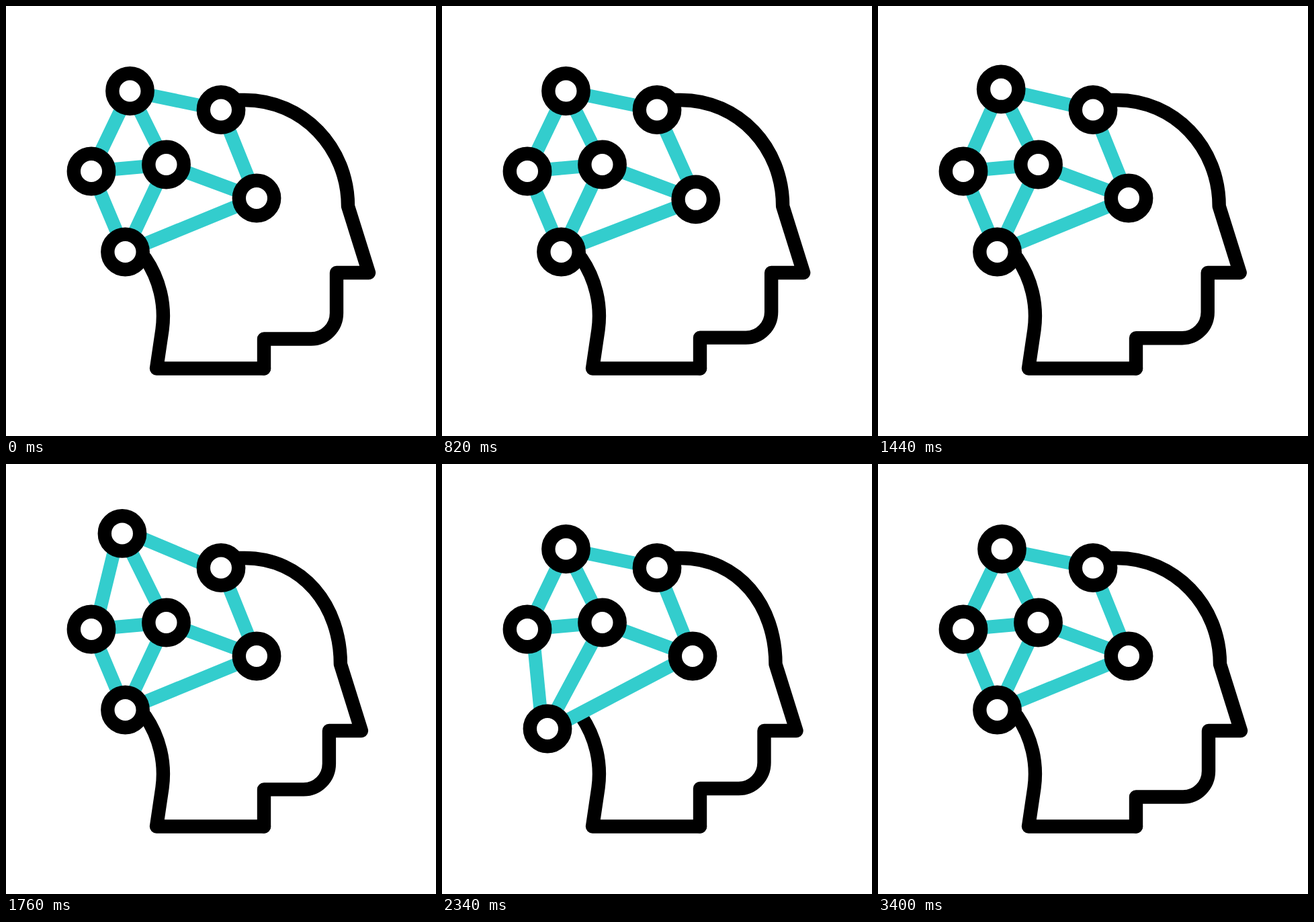
Animation, 640 px wide and 640 px high, one loop 3.6 s. Source, as an HTML page without scripts:

```html
<!DOCTYPE html>
<html lang="en">
<head>
<meta charset="utf-8">
<title>Thinking head</title>
<style>
html, body { margin: 0; width: 100%; height: 100%; overflow: hidden; background: #fff; }
svg { display: block; width: 100%; height: 100%; --rest: none; --still: 0px 0px; }
path { fill: none; stroke: #000; stroke-width: 20.4; stroke-linecap: round; stroke-linejoin: round; }
circle { r: 26.2px; fill: #fff; stroke: #000; stroke-width: 20.4; }
.net path { stroke: #33cdcd; stroke-width: 20; stroke-linecap: butt; }
.spark path { stroke-width: 20; stroke-dasharray: 1 2; animation: spark 3.6s ease-in-out infinite; }
.live { animation: pulse 3.6s cubic-bezier(.37, 0, .63, 1) infinite; }

/* three pulses; each part names the pose it takes in pulse a, b or c */
@keyframes pulse {
  0%, 20.56%, 38.2%, 56%, 73.9%, 100% { d: var(--rest); translate: var(--still); }
  29.44% { d: var(--a, var(--rest)); translate: var(--move-a, var(--still)); }
  46.94% { d: var(--b, var(--rest)); translate: var(--move-b, var(--still)); }
  65% { d: var(--c, var(--rest)); translate: var(--move-c, var(--still)); }
}
/* strokes shoot out of the middle node, then their tails follow */
@keyframes spark {
  0%, 6.11%, 78.33% { stroke-dashoffset: 1; animation-timing-function: cubic-bezier(.37, 0, .63, 1); }
  13.61%, 85.83% { stroke-dashoffset: 0; }
  21.11% { stroke-dashoffset: -1.1; animation-timing-function: step-end; }
  93.33%, 100% { stroke-dashoffset: -1.1; }
}

.face {
  --rest: path("m346 140 h9 c87 0 154 71 154 158 l31 99 h-48 v60 c0 21.3 -17 38.5 -38 38.5 h-70 v44");
  --in: path("m346 140 h9 c87 0 141.5 71 141.5 158 l31 99 h-48 v47.5 c0 21.3 -17 38.5 -38 38.5 h-57.5 v56.5");
  --a: var(--in);
  --b: var(--in);
  --c: var(--in);
}
.right { --move-a: 32px 12.5px; }
.top { --move-b: -13px -26px; }
.low { --move-c: -20.5px 28px; }

/* links run between ring edges */
.to-right {
  --rest: path("M329.7 178.6 L363.3 261.9 M262.9 245.1 L348.6 276.9");
  --a: path("M329.7 178.6 L395.3 274.4 M262.9 245.1 L380.6 289.4");
}
.to-top {
  --rest: path("M294.5 149.2 L210 131.8 M138.3 222.6 L173.2 149.9 M227 212.7 L196 149.8");
  --b: path("M294.5 149.2 L197 105.8 M138.3 222.6 L160.2 123.9 M227 212.7 L183 123.8");
}
.to-low {
  --rest: path("M137.1 270 L167.4 342 M227.5 259.5 L188.5 342.5");
  --c: path("M137.1 270 L146.9 370 M227.5 259.5 L168 370.5");
}
.low-right {
  --rest: path("M201.6 356.2 L348.9 295.8");
  --a: path("M201.6 356.2 L380.9 308.3");
  --c: path("M181.1 384.2 L348.9 295.8");
}
</style>
</head>
<body>
<svg viewBox="0 0 640 640">
  <path class="face live"/>
  <path d="M384 539.5 H224 L232.5 482 A152 152 0 0 0 207 375"/>
  <g class="net">
    <path d="M127 246 L238.5 236"/>
    <path class="to-right live"/>
    <path class="to-top live"/>
    <path class="to-low live"/>
    <path class="low-right live"/>
  </g>
  <g class="spark">
    <path pathLength="1" d="M227 212.7 L196 149.8"/>
    <path pathLength="1" d="M262.9 245.1 L348.6 276.9"/>
    <path pathLength="1" d="M227.5 259.5 L188.5 342.5"/>
  </g>
  <circle cx="320" cy="154.5"/>
  <circle cx="127" cy="246"/>
  <circle cx="238.5" cy="236"/>
  <circle class="right live" cx="373" cy="286"/>
  <circle class="top live" cx="184.5" cy="126.5"/>
  <circle class="low live" cx="177.5" cy="366"/>
</svg>
</body>
</html>
```
